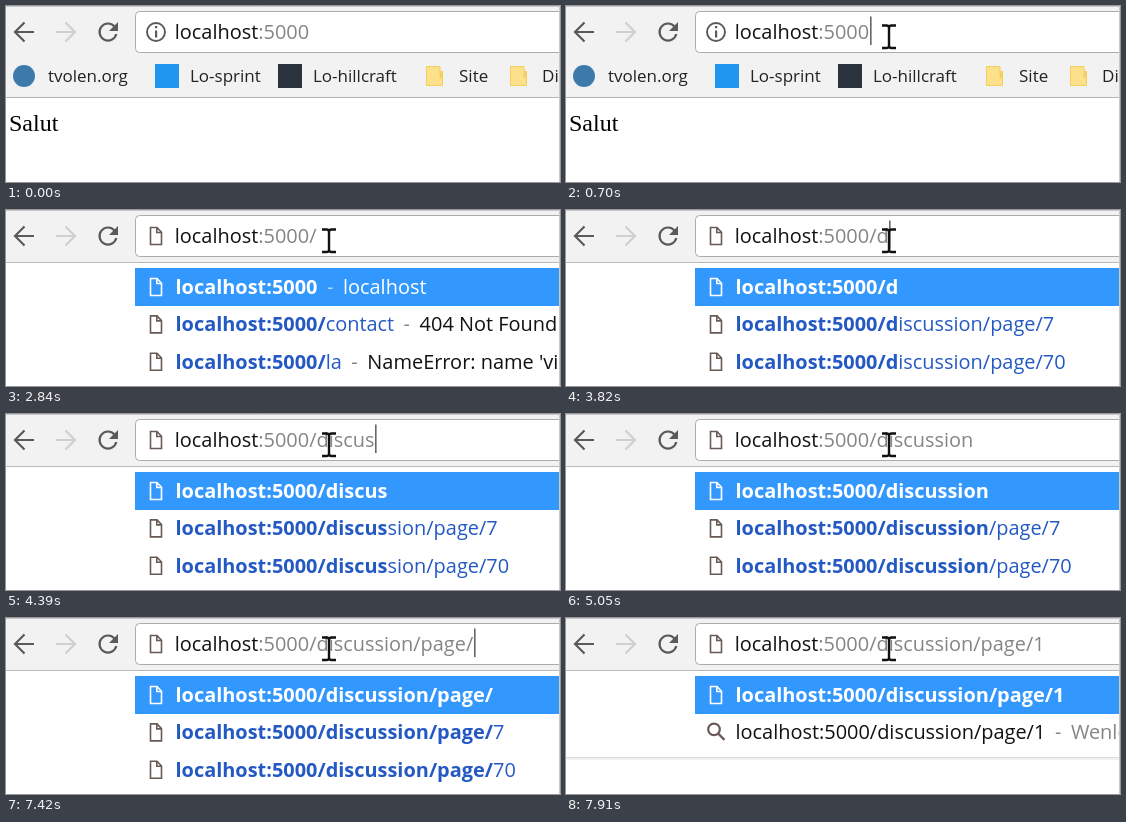
An HTML page that plays this animation: 554 by 176 pixels, repeating every 8000 ms.

```html
<!DOCTYPE html>
<html lang="en">
<head>
<meta charset="utf-8">
<title>Typing an address</title>
<style>
html, body { margin: 0; width: 100%; height: 100%; overflow: hidden; background: #fff; }
svg { display: block; }
text { font: 19.93px "Open Sans", "Noto Sans", sans-serif; white-space: pre; fill: #111; }
.marks text { font-size: 17px; fill: #222; }
text.page { font: 24px "Liberation Serif", serif; fill: #000; }
.b { font-weight: 700; }
.link { fill: #2459c4; }
.grey { fill: #858585; }
.white { fill: #fff; }
.pale { fill: #b5dafd; }
.dash { word-spacing: 4.4px; }
.line { fill: none; stroke: #5a5a5a; stroke-width: 2.2; }
</style>
</head>
<body>
<svg width="554" height="176" viewBox="0 0 554 176">
  <defs>
    <path id="file" d="M1 1h6.5l4.5 4.7v12.3h-11zM7.3 1v5h4.7" fill="none" stroke-width="1.6"/>
    <g id="folder">
      <path d="M0 1q0-1 1-1h12.5q1 0 1 1v4h2.5v14q0 1-1 1h-15q-1 0-1-1z" fill="#f3cf62"/>
      <path d="M1 1h12.500v10l2.500 2v6h-15z" fill="#fde08a"/>
    </g>
  </defs>

  <rect width="554" height="176" fill="#fff"/>
  <rect width="554" height="91" fill="#f2f2f2"/>
  <rect y="91" width="554" height="1" fill="#b6b6b6"/>
  <text class="page" x="3" y="125">Salut</text>

  <g class="marks">
    <rect id="hover" x="264" y="54" width="144" height="33" rx="3" fill="#dedede"/>
    <circle cx="18" cy="70" r="11" fill="#3d7aab"/>
    <rect x="149" y="58" width="24" height="24" fill="#2196ee"/>
    <rect x="272" y="58" width="24" height="24" fill="#2b343d"/>
    <use href="#folder" x="420" y="60"/>
    <use href="#folder" x="504" y="60"/>
    <text x="42" y="76">tvolen.org</text>
    <text x="184" y="76">Lo-sprint</text>
    <text x="307" y="76">Lo-hillcraft</text>
    <text x="453" y="76">Site</text>
    <text x="536" y="76">Divers</text>
  </g>

  <g id="drop">
    <rect y="52" width="554" height="124" fill="#fff"/>
    <rect y="52" width="554" height="1" fill="#b9b9b9"/>
    <g id="foot">
      <rect y="139" width="554" height="1" fill="#dcdcdc"/>
      <rect y="140" width="554" height="2" fill="#f1f1f1"/>
    </g>
    <rect x="129" y="58" width="425" height="38" fill="#3398fe"/>
    <g id="rows"></g>
  </g>

  <path class="line" d="M28 26H10M18.5 16.5l-9.5 9.5 9.5 9.5"/>
  <path class="line" style="stroke:#cfcfcf" d="M50 26h18M59.5 16.5l9.5 9.5-9.5 9.5"/>
  <path class="line" d="M108.5 20.5a8.500 8.500 0 1 0 1.800 7.500"/>
  <path d="M112 16v9h-9z" fill="#5a5a5a"/>
  <path d="M554 5.5H133.5q-4 0-4 4V42.500q0 4 4 4H554" fill="#fff" stroke="#ababab"/>
  <g id="info">
    <circle class="line" cx="150" cy="26" r="9" style="stroke-width:1.9"/>
    <path d="M149 20h2.200v2.300h-2.200zM149 24.500h2.200v7h-2.200z" fill="#5a5a5a"/>
  </g>
  <use id="doc" href="#file" x="143.5" y="16.5" stroke="#6a5a54"/>
  <rect id="select" x="169.5" y="11" height="28" fill="#3399ff"/>
  <text id="url" x="168.8" y="33"></text>
  <rect id="caret" y="10.5" width="1.6" height="28.5" fill="#666"/>
  <path d="M0 .5H553.500V176" fill="none" stroke="#c8c8c8"/>

  <path id="beam" d="M-7-10.500h4.500q2.500 0 2.500 2.500q0-2.500 2.500-2.500h4.500M0-9v20M-7 12h4.500q2.500 0 2.500-2.500q0 2.500 2.500 2.500h4.500"
    fill="none" stroke="#111" stroke-width="2.4"/>
  <path id="arrow" d="M0 0v21l5-4.500 3.500 8 3.500-1.500-3.500-8h7z" fill="#fff" stroke="#111" stroke-width="1.2"/>
</svg>
<script>
const $ = id => document.getElementById(id);
const LOOP = 8000, HOST = "localhost", PORT = ":5000", PATH = "/discussion/page/1";
const keys = [1720, 3820, 3990, 4070, 4170, 4280, 4390, 4460, 4540, 4620, 4690,
  5310, 5640, 5740, 5840, 5940, 7420, 7570];
const caretOff = [[830, 1360], [2080, 2440], [2840, 3200], [3560, 3820], [5050, 5310],
  [6300, 6660], [7060, 7420], [7910, LOOP]];

const show = (id, on) => $(id).style.display = on ? "" : "none";
const span = (text, cls) => `<tspan class="${cls}">${text}</tspan>`;
const dash = cls => span(" - ", "dash " + cls);

function row(i, spans, search) {
  const y = 77 + 37.4 * i;
  const icon = search
    ? `<g class="line" style="stroke:#6a5a54"><circle cx="148" cy="${y - 3}" r="5.8"/><path d="M152 ${y + 1}l6.5 6.5"/></g>`
    : `<use href="#file" x="143.5" y="${y - 9.5}" stroke="${i ? "#6a5a54" : "#fff"}"/>`;
  return icon + `<text x="169.5" y="${y + 7}">${spans}</text>`;
}

function suggestions(typed) {
  const base = HOST + PORT, full = base + typed;
  if (typed.length < 2) {
    const weight = typed ? "b " : "";
    const entry = (i, path, title) => row(i, span(base + "/", weight + "link") +
      span(path, "link") + dash("grey") + title);
    return row(0, span(base, weight + "white") + dash("pale") + span(HOST, "white")) +
      entry(1, "contact", "404 Not Found") +
      entry(2, "la", "NameError: name 'via' is not");
  }
  const first = row(0, span(full, "b white"));
  if (typed === PATH) return first + row(1, full + dash("grey") + span("Wenlor", "grey"), true);
  const match = (i, page) => row(i, span(full, "b link") +
    span(("/discussion/page/" + page).slice(typed.length), "link"));
  return first + match(1, "7") + match(2, "70");
}

let last = "";
function refresh(typed, open, selected) {
  const key = [typed, open, selected].join();
  if (key === last) return;
  last = key;
  $("url").innerHTML = selected ? span(HOST + PORT, "white")
    : HOST + span(PORT + typed, "grey");
  const width = $("url").getComputedTextLength();
  $("caret").setAttribute("x", Math.round(169.2 + width));
  $("select").setAttribute("width", width);
  $("rows").innerHTML = suggestions(typed);
  show("foot", typed === PATH);
  show("drop", open);
  show("select", selected);
  show("info", !typed);
  show("doc", typed);
}

function draw(t) {
  const typed = PATH.slice(0, keys.filter(k => k <= t).length);
  refresh(typed, t >= 830, t >= 830 && t < 1360);
  show("caret", t >= 700 && !caretOff.some(([a, b]) => t >= a && t < b));

  // The pointer rises from the page into the address field.
  const p = Math.min(1, Math.max(0, (t - 200) / 300));
  const e = 1 - (1 - p) ** 2;
  const x = 345 - 22 * e, y = 176 - 146 * e;
  const inField = y < 47;
  show("beam", inField);
  show("arrow", t >= 200 && !inField);
  show("hover", y > 54 && y < 87);
  for (const id of ["beam", "arrow"]) $(id).setAttribute("transform", `translate(${x} ${y})`);
}

const start = performance.now();
function tick() {
  draw((performance.now() - start) % LOOP);
  requestAnimationFrame(tick);
}
tick();
</script>
</body>
</html>
```
